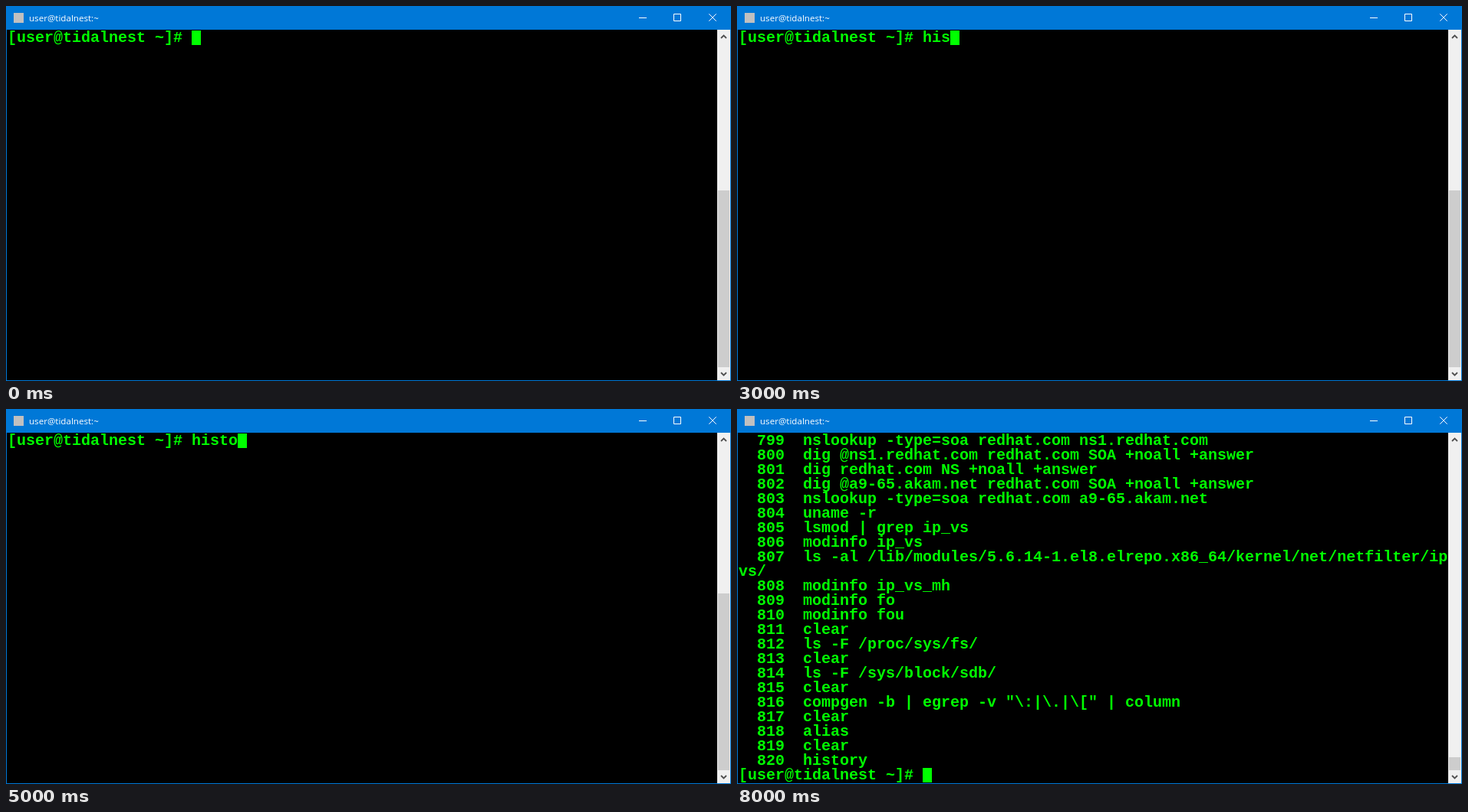
Animation, 945 px wide and 490 px high, one loop 9 s. Source, as an HTML page:

```html
<!DOCTYPE html>
<html lang="en">
<head>
<meta charset="utf-8">
<title>Terminal history</title>
<style>
  html, body { margin: 0; width: 100%; height: 100%; overflow: hidden; background: #000; }
  svg { display: block; width: 945px; height: 490px; }
  .title { font: 11.6px "Open Sans", "Noto Sans", sans-serif; fill: #fff; }
  .line { font: bold 20px "Liberation Mono", "DejaVu Sans Mono", monospace; fill: #0f0; white-space: pre; }
  .button { fill: none; stroke: #fff; }
  .arrow { fill: none; stroke: #505050; stroke-width: 1.8; }
</style>
</head>
<body>
<svg viewBox="0 0 945 490">
  <rect width="945" height="490" fill="#0078d7"/>
  <rect x="1" y="31" width="926" height="458" fill="#000"/>

  <rect x="10" y="9" width="13" height="13" fill="#c0c0c0"/>
  <text class="title" x="30" y="20">user@tidalnest:~</text>
  <path class="button" d="M825 15.5h10M870.5 10.5h9v9h-9z"/>
  <path class="button" d="M916.3 10.3l9.4 9.4M925.7 10.3l-9.4 9.4"/>

  <rect x="927" y="31" width="17" height="458" fill="#f0f0f0"/>
  <rect id="thumb" x="928" width="15" fill="#cdcdcd"/>
  <path class="arrow" d="M932 42l3.5-3.5 3.5 3.5M932 479l3.5 3.5 3.5-3.5"/>

  <g id="screen"></g>
  <rect id="cursor" width="12" height="19" fill="#0f0"/>
</svg>
<script>
const LOOP = 9000, STEP = 1000;
const LEFT = 2, TOP = 32, CELL = 12, ROW = 19, BASELINE = 15;
const THUMB_BOTTOM = 472;
const PROMPT = "[user@tidalnest ~]# ";
const COMMAND = "history";
const FIRST_ENTRY = 799, COLUMNS = 77;

const entries = String.raw`nslookup -type=soa redhat.com ns1.redhat.com
dig @ns1.redhat.com redhat.com SOA +noall +answer
dig redhat.com NS +noall +answer
dig @a9-65.akam.net redhat.com SOA +noall +answer
nslookup -type=soa redhat.com a9-65.akam.net
uname -r
lsmod | grep ip_vs
modinfo ip_vs
ls -al /lib/modules/5.6.14-1.el8.elrepo.x86_64/kernel/net/netfilter/ipvs/
modinfo ip_vs_mh
modinfo fo
modinfo fou
clear
ls -F /proc/sys/fs/
clear
ls -F /sys/block/sdb/
clear
compgen -b | egrep -v "\:|\.|\[" | column
clear
alias
clear
history`.split("\n");

// Long lines wrap at the terminal's width.
const wrap = line => line.match(new RegExp(`.{1,${COLUMNS}}`, "g"));
const listing = entries.flatMap((entry, i) => wrap(`  ${FIRST_ENTRY + i}  ${entry}`));

const screenGroup = document.getElementById("screen");
const cursor = document.getElementById("cursor");
const thumb = document.getElementById("thumb");

function makeLine(text, row) {
  const node = document.createElementNS("http://www.w3.org/2000/svg", "text");
  node.setAttribute("class", "line");
  node.setAttribute("x", LEFT);
  node.setAttribute("y", TOP + row * ROW + BASELINE);
  node.textContent = text;
  return node;
}

function draw(step) {
  const done = step > COMMAND.length;
  const lines = done ? [...listing, PROMPT] : [PROMPT + COMMAND.slice(0, step)];
  const lastRow = lines.length - 1;
  const thumbTop = done ? 455 : 241;

  screenGroup.replaceChildren(...lines.map(makeLine));
  cursor.setAttribute("x", LEFT + lines[lastRow].length * CELL);
  cursor.setAttribute("y", TOP + lastRow * ROW);
  thumb.setAttribute("y", thumbTop);
  thumb.setAttribute("height", THUMB_BOTTOM - thumbTop);
}

const start = performance.now();
let shown = -1;

function tick() {
  const step = Math.floor(((performance.now() - start) % LOOP) / STEP);
  if (step !== shown) draw(shown = step);
  requestAnimationFrame(tick);
}
tick();
</script>
</body>
</html>
```
